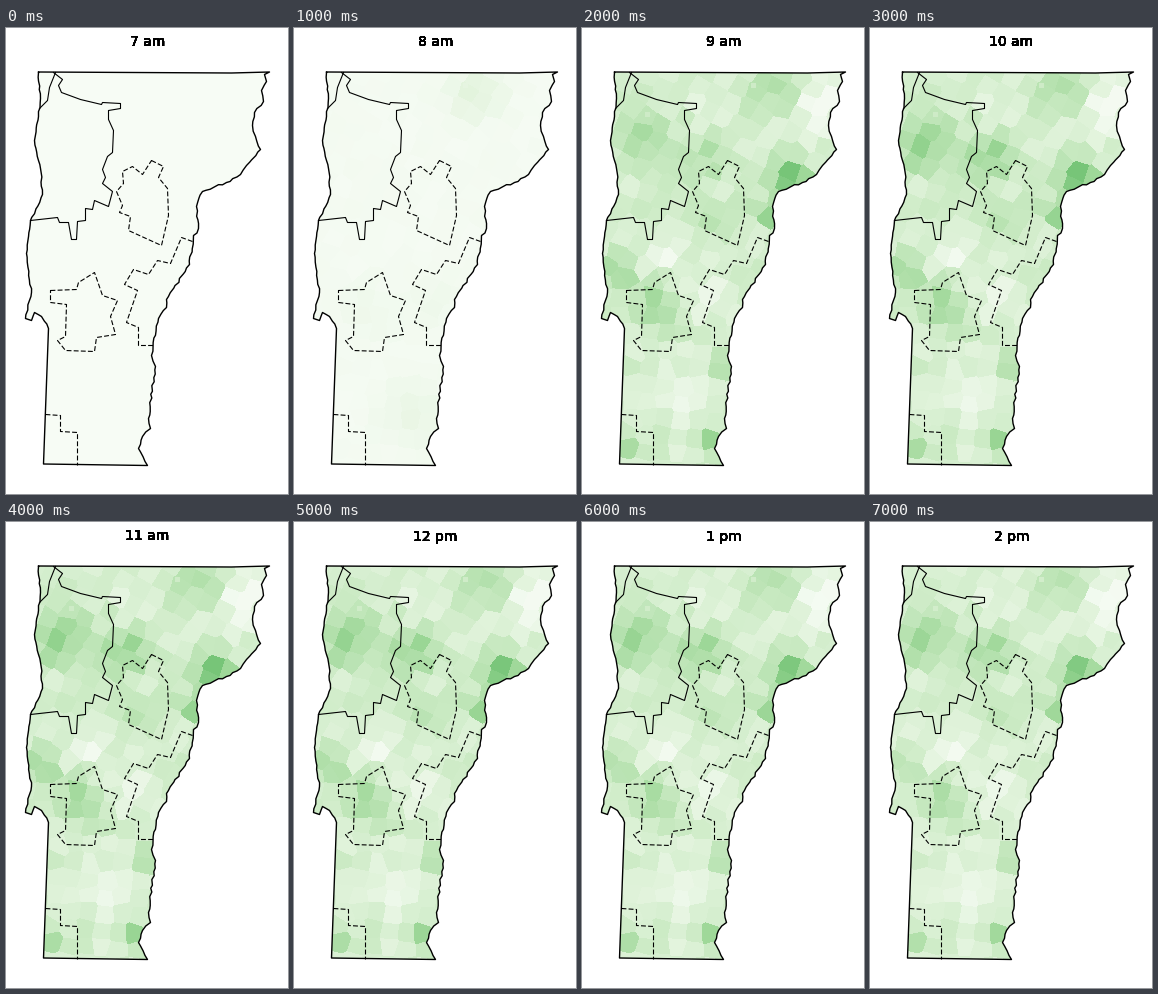
Recreate the animation shown at these times as a matplotlib script. Size 282 by 466 pixels, loop 8 s.

```python
import numpy as np
import matplotlib.pyplot as plt
from matplotlib.animation import FuncAnimation
from matplotlib.patches import Polygon

W, H, DPI = 282, 466, 100
HOURS = [f"{(h - 1) % 12 + 1} {'am' if h < 12 else 'pm'}" for h in range(7, 15)]
rng = np.random.default_rng(12)

# Key points of the borders, in pixels
NORTH = [(32, 43.5), (225, 44.5), (263, 43.5)]
EAST = [(258, 46), (260, 53), (255, 62), (257, 73), (248, 84), (246, 97),
        (249, 108), (254, 121), (240, 137), (234, 146), (220, 154),
        (196, 163), (190, 178), (192, 200), (187, 207), (183, 236),
        (160, 271), (160, 279), (152, 290), (145, 327), (149, 338),
        (142, 390), (144, 400), (136, 408), (132, 420), (141, 437)]
WEST = [(42, 300), (35, 288), (28, 284), (25, 292), (19, 290), (25, 264),
        (20, 225), (24, 192), (36, 166), (34, 140), (28, 112), (32, 88),
        (34, 70), (32, 44)]
NORTHWEST = [(47, 44), (56, 51), (52, 57), (55, 64), (74, 71), (95, 76),
             (96, 74), (114, 75), (114, 80), (102, 82), (102, 91), (107, 102),
             (106, 124), (101, 128), (96, 141), (99, 149), (96, 155),
             (106, 163), (102, 178), (88, 172), (86, 181), (79, 180),
             (79, 192), (71, 193), (70, 211), (65, 211), (62, 194),
             (53, 194), (51, 189), (24, 192)]
ISLANDS = [(49, 44), (43, 59), (41, 72), (33, 80)]
CENTRE = [(145, 132), (157, 138), (152, 149), (161, 160), (162, 187),
          (155, 217), (122, 202), (124, 188), (113, 184), (116, 177),
          (110, 163), (117, 155), (116, 143), (126, 138), (136, 146),
          (145, 132)]
RIVER = [(186, 213), (175, 209), (164, 235), (151, 232), (142, 246),
         (127, 241), (118, 256), (131, 262), (120, 294), (132, 299),
         (132, 317), (147, 317)]
VALLEY = [(44, 262), (70, 261), (72, 254), (88, 244), (96, 267), (111, 272),
          (104, 288), (109, 306), (90, 309), (88, 323), (59, 322), (51, 312),
          (59, 308), (60, 276), (44, 274), (44, 262)]
CORNER = [(39, 386), (54, 387), (54, 403), (71, 404), (71, 437)]

# Busy and quiet areas: x, y, radius, change from the mean level
MEAN = .19
AREAS = [(208, 152, 20, .32), (186, 184, 15, .20), (44, 126, 13, .25),
         (66, 110, 28, .15), (118, 128, 22, .21), (130, 190, 20, .14),
         (188, 62, 26, .14), (238, 78, 27, -.16), (125, 68, 26, -.06),
         (36, 240, 16, .18), (78, 280, 24, .19), (84, 230, 15, -.15),
         (122, 265, 24, -.09), (104, 365, 24, -.12), (142, 335, 13, .18),
         (45, 415, 16, .14), (128, 412, 14, .16)]
VILLAGES = [(65, 86), (171, 57)]


def rough(points, amp=1.0, piece=4):
    """Break each leg of a shore in short uneven pieces."""
    out = []
    for a, b in zip(np.array(points, float), np.array(points[1:], float)):
        n = max(1, int(np.hypot(*(b - a)) // piece))
        out.append(a)
        out += [a + (b - a) * k / n + rng.uniform(-amp, amp, 2) for k in range(1, n)]
    return out + [points[-1]]


def lattice(tilt, step=17):
    """Centres of a tilted, slightly uneven grid of towns."""
    i, j = np.mgrid[-40:40, -40:40]
    c, s = np.cos(np.radians(tilt)), np.sin(np.radians(tilt))
    x = 140 + step * (i * c - j * s)
    y = 240 + step * (i * s + j * c)
    pts = np.column_stack([x.ravel(), y.ravel()])
    return pts + rng.uniform(-3.5, 3.5, pts.shape)


def is_hilly(p):
    return (p[:, 1] < 250) | ((p[:, 0] > 115) & (p[:, 1] < 300))


def town_sites():
    north, south = lattice(27), lattice(3)
    pts = np.vstack([north[is_hilly(north)], south[~is_hilly(south)]])
    x, y = pts.T
    return pts[(x > 8) & (x < 272) & (y > 33) & (y < 450)]


def town_raster(sites):
    """Index of the nearest town for each pixel; villages are small discs."""
    yy, xx = np.mgrid[0:H, 0:W]
    best, index = np.full((H, W), np.inf), np.zeros((H, W), int)
    for k, (x, y) in enumerate(sites):
        d = (xx - x) ** 2 + (yy - y) ** 2
        near = d < best
        best[near], index[near] = d[near], k
    for k, (x, y) in enumerate(VILLAGES, len(sites)):
        index[(xx - x) ** 2 + (yy - y) ** 2 < 9] = k
    return index


sites = town_sites()
towns = town_raster(sites)
sites = np.vstack([sites, VILLAGES])


def bump(x, y, r):
    return np.exp(-((sites[:, 0] - x) ** 2 + (sites[:, 1] - y) ** 2) / r ** 2)


noise = rng.uniform(-1, 1, len(sites))
BUSY = MEAN + sum(v * bump(x, y, r) for x, y, r, v in AREAS) + .05 * noise
BUSY[-len(VILLAGES):] = .22
BUSY = BUSY.clip(.02, 1)
FAINT = (.02 + .12 * bump(180, 65, 26) + .07 * bump(118, 385, 32)
         + .04 * bump(75, 285, 28) + .04 * bump(140, 275, 26) + .008 * noise)


def levels(step):
    if step == 0:
        return np.zeros(len(sites))
    if step == 1:
        return FAINT
    if step == 2:
        return BUSY - .13 * bump(44, 126, 20) - .09 * bump(116, 128, 22)
    fade = ((step - 3) / 4) ** 2
    return BUSY * (1 - .07 * fade) - .05 * fade * bump(36, 240, 25)


fig = plt.figure(figsize=(W / DPI, H / DPI), dpi=DPI, facecolor="white")
ax = fig.add_axes([0, 0, 1, 1])
ax.axis("off")

border = NORTH + rough(EAST) + [(37, 435.5)] + rough(WEST, .7)
land = Polygon(border, closed=True, fc="none", ec="none")
ax.add_patch(land)
image = ax.imshow(levels(0)[towns], cmap="Greens", vmin=0, vmax=1,
                  interpolation="nearest", aspect="auto")
image.set_clip_path(land)
ax.set_xlim(-.5, W - .5)
ax.set_ylim(H - .5, -.5)


def line(points, lw=.8, **style):
    ax.plot(*np.transpose(points), color="black", lw=lw, **style)


line(border, lw=1)
line(NORTHWEST)
line(ISLANDS)
for part in (CENTRE, RIVER, VALLEY, CORNER):
    line(part, ls=(0, (4.4, 2)), dash_capstyle="butt")

# Stacked copies give the lettering hard, heavy edges
titles = [ax.text(141, 18, "", fontsize=10, family="DejaVu Sans",
                  ha="center", va="baseline") for _ in range(16)]


def draw(step):
    image.set_data(levels(step)[towns])
    for t in titles:
        t.set_text(HOURS[step])
    return [image, *titles]


anim = FuncAnimation(fig, draw, frames=len(HOURS), interval=1000, repeat=True)
plt.show()
```
